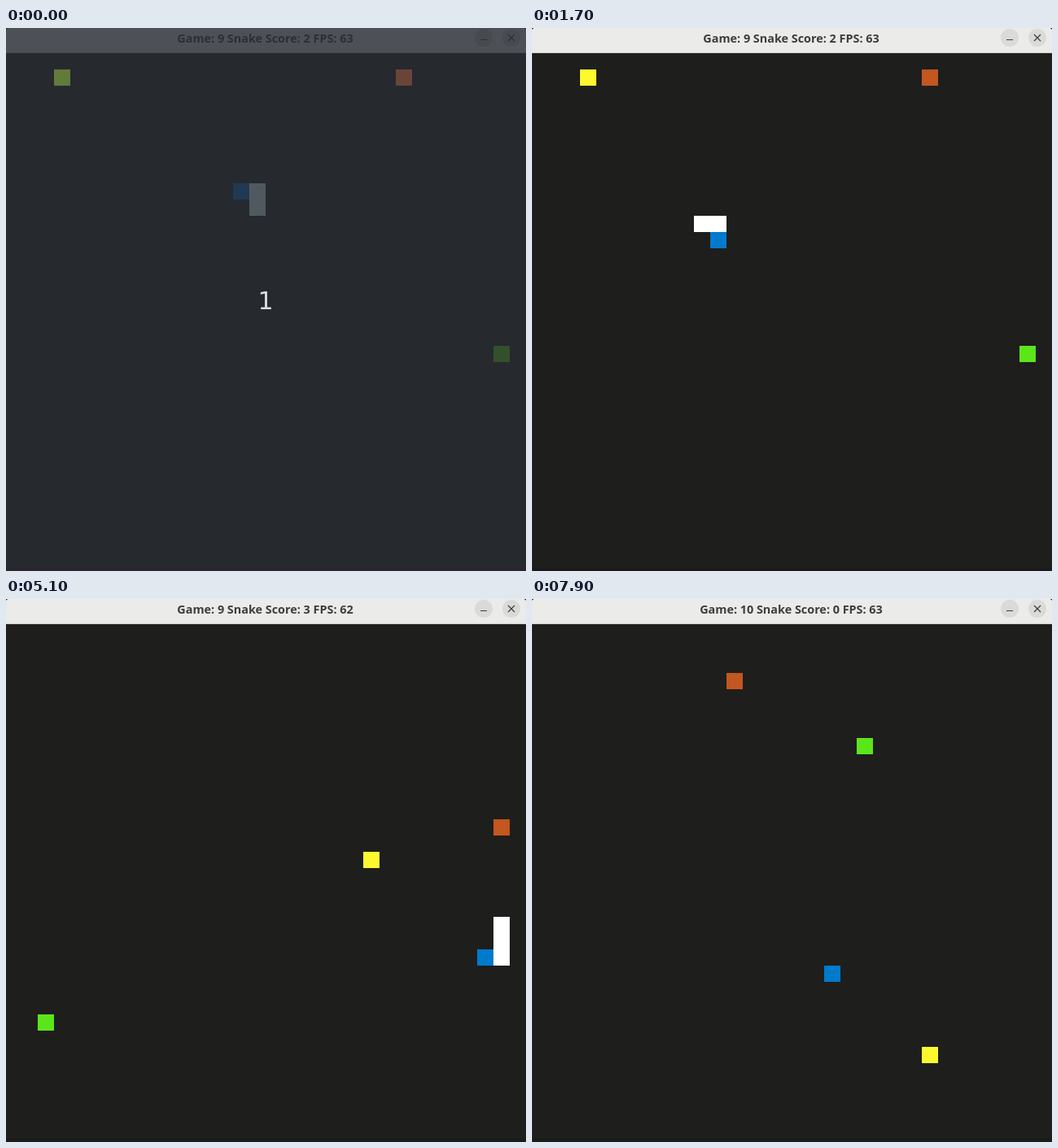
An HTML page for the animation above (8000 ms loop, 639x668 px).

```html
<!DOCTYPE html>
<html lang="en">
<head>
<meta charset="utf-8">
<title>Snake</title>
<style>
  html, body { margin: 0; width: 100%; height: 100%; overflow: hidden; background: #1e1e1c; }
  svg {
    display: block; width: 639px; height: 668px;
    --bar: #ebebe9; --rule: #c9cdc6; --ink: #3d3d3d; --button: #dadad8;
    --field: #1e1e1c; --edge: #1a1a1a;
    --head: #007acc; --body: #fff; --yellow: #fcfa2e; --orange: #c2571f; --green: #5be61a;
  }
  svg.dim {
    --bar: #4d5157; --rule: #45494e; --ink: #2c2f35; --button: #474b50;
    --field: #26292e; --edge: #28252f;
    --head: #203a53; --body: #515960; --yellow: #647a3a; --orange: #694539; --green: #32512b;
  }
  .bar { fill: var(--bar); }
  .rule { fill: var(--rule); }
  .button { fill: var(--button); }
  .icon { fill: none; stroke: var(--ink); stroke-width: 1.2; }
  .field { fill: var(--field); }
  .edge { fill: var(--edge); }
  .title { font: bold 14.4px "Open Sans", "Noto Sans", sans-serif; fill: var(--ink); text-anchor: middle; }
  .count { font: 30px "DejaVu Sans", sans-serif; fill: #dcdcdc; text-anchor: middle; visibility: hidden; }
  .dim .count { visibility: visible; }
</style>
</head>
<body>
<svg id="stage" viewBox="0 0 639 668" shape-rendering="auto">
  <rect class="field" width="639" height="668"/>
  <path class="bar" d="M0 30V2L2 0H637L639 2V30Z"/>
  <rect class="rule" y="30" width="639" height="1"/>
  <rect class="edge" y="664" width="639" height="4"/>
  <text class="title" id="title" x="318.5" y="18"></text>
  <circle class="button" cx="587" cy="12" r="11"/>
  <circle class="button" cx="621" cy="12" r="11"/>
  <path class="icon" d="M583 14.5h8M617 8l8 8m0-8l-8 8"/>
  <g id="cells" shape-rendering="crispEdges"></g>
  <text class="count" x="319" y="346">1</text>
</svg>
<script>
  const TICK = 100, TICKS = 80;
  const STEP = { L: [-1, 0], R: [1, 0], U: [0, -1], D: [0, 1] };

  // Each round: one letter per tick, a dot means the snake rests.
  const rounds = [
    { from: 0, game: 9, score: 2, start: [[15, 10], [15, 9], [14, 9]],
      route: "LLLLLL.LD.DRRRR.DDRRRR.DDRRR.RRRRR.RRRRR.RRDD.DDDDLLLL.LLUUUUUULLL.LL" },
    { from: 70, game: 10, score: 0, start: [[16, 17]], route: "DDD.DDR.R" }
  ];
  const GROW_AT = 48;

  const foods = [
    { from: 0, yellow: [3, 2], orange: [24, 2], green: [30, 19] },
    { from: 48, yellow: [22, 15], orange: [30, 13], green: [2, 25] },
    { from: 65, yellow: [9, 1], orange: [18, 15], green: [1, 27] },
    { from: 70, yellow: [24, 27], orange: [12, 4], green: [20, 8] }
  ];

  const fpsChanges = [[0, 63], [2, 62], [12, 63], [22, 62], [52, 63], [62, 62], [72, 63]]
    .map(([from, value]) => ({ from, value }));

  const stage = document.getElementById("stage");
  const title = document.getElementById("title");
  const cells = document.getElementById("cells");

  const current = (list, tick) => list.filter(item => item.from <= tick).pop();

  const square = ([col, row], color) =>
    `<rect x="${col * 20 - 1}" y="${row * 20 + 11}" width="20" height="20" style="fill:var(--${color})"/>`;

  function snakeAt(round, tick) {
    const trail = round.start.slice();
    for (const move of round.route.slice(0, tick - round.from)) {
      if (move === ".") continue;
      const [col, row] = trail[trail.length - 1];
      trail.push([col + STEP[move][0], row + STEP[move][1]]);
    }
    const grown = round.score && tick >= GROW_AT ? 1 : 0;
    return trail.slice(-(round.start.length + grown));
  }

  function draw(tick) {
    const round = current(rounds, tick);
    const food = current(foods, tick);
    const snake = snakeAt(round, tick);
    const score = round.score + snake.length - round.start.length;

    stage.classList.toggle("dim", tick === 0);
    title.textContent =
      `Game: ${round.game} Snake Score: ${score} FPS: ${current(fpsChanges, tick).value}`;
    cells.innerHTML =
      ["yellow", "orange", "green"].map(color => square(food[color], color)).join("") +
      snake.map((cell, i) => square(cell, i === snake.length - 1 ? "head" : "body")).join("");
  }

  const begin = performance.now();
  let shown = -1;
  function frame() {
    const tick = Math.floor((performance.now() - begin) / TICK) % TICKS;
    if (tick !== shown) draw(shown = tick);
    requestAnimationFrame(frame);
  }
  frame();
</script>
</body>
</html>
```
